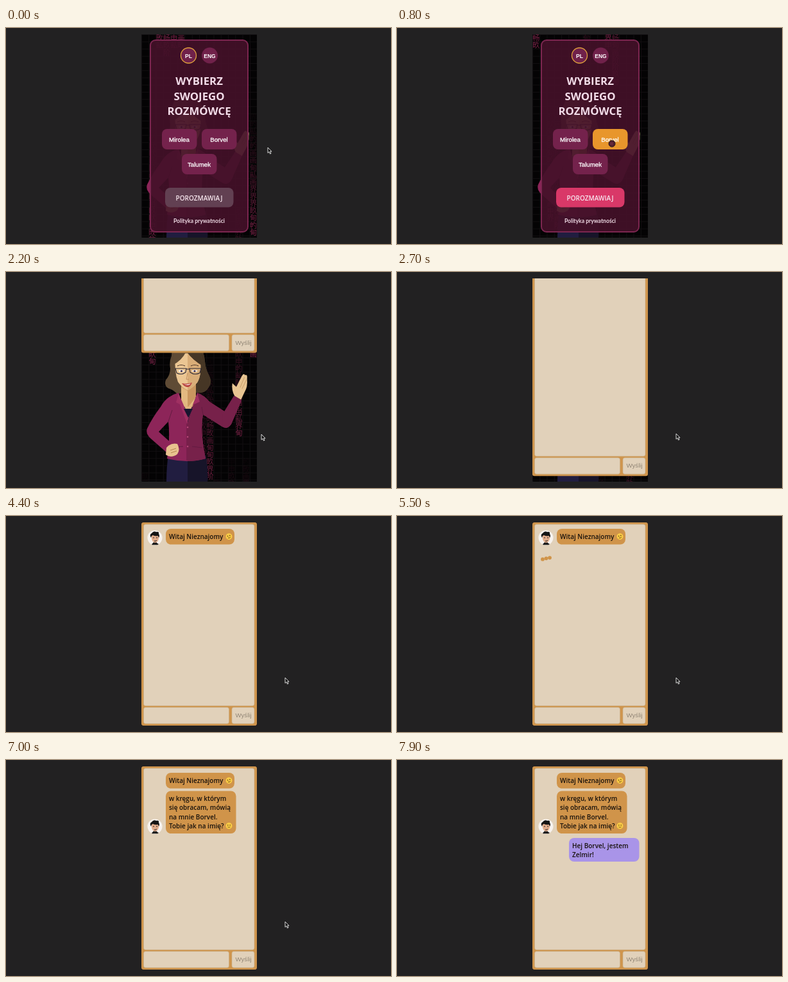
Animation, 600 px wide and 338 px high, one loop 8 s. Source, as an HTML page:

```html
<!DOCTYPE html>
<html lang="pl">
<head>
<meta charset="utf-8">
<style>
html, body { margin: 0; width: 100%; height: 100%; overflow: hidden; background: #222122; }
svg { display: block; width: 100vw; height: 100vh; }
.ui { font-family: "Liberation Sans", Arial, sans-serif; }
.hand { font-family: "Comic Neue", "Open Sans", sans-serif; }
.mid { text-anchor: middle; }
#rain { font: 11px "Noto Sans CJK SC", "Noto Sans CJK JP", sans-serif; fill: #8e2853; }
.title { font-size: 16.8px; font-weight: 700; fill: #f2dce8; }
.chat { font-size: 10px; font-weight: 600; fill: #17110c; }
</style>
</head>
<body>
<svg viewBox="0 0 600 338">
  <defs>
    <clipPath id="screen"><rect x="211" y="10" width="180" height="318"/></clipPath>
    <clipPath id="shade"><rect x="283" y="100" width="108" height="230"/></clipPath>
    <pattern id="grid" x="211" y="10" width="11.25" height="11.25" patternUnits="userSpaceOnUse">
      <rect width="11.25" height="11.25" fill="#040304"/>
      <path d="M0 .5H11.25M.5 0V11.25" stroke="#110e10" fill="none"/>
    </pattern>
    <g id="avatar">
      <circle r="11.5" fill="#f7f2ee"/>
      <path d="M-5 10 0 6 6 10 4 11.2H-4Z" fill="#222"/>
      <path d="M-5-4Q-6 4-2 7Q1 9 4 6Q7 2 6-4Z" fill="#e2ad8c"/>
      <path d="M-6 0Q-9-5-5-7Q-2-11 2-9Q7-10 6-6Q8-3 6 0L5-3Q0-2-3-4L-5-3Z" fill="#151515"/>
      <path d="M-3 0H-1M2 0H4M-1 5Q1 6 3 4" stroke="#222" fill="none"/>
      <path d="M0 9-3 7.500V10.500L0 9 3 10.500V7.500Z" fill="#151515"/>
    </g>
    <g id="smile">
      <circle r="5" fill="#f8cb45"/>
      <circle cx="-1.700" cy="-1" r=".8" fill="#5c3a12"/><circle cx="1.700" cy="-1" r=".8" fill="#5c3a12"/>
      <path d="M-2 1.700Q0 3.200 2 1.700" fill="none" stroke="#5c3a12" stroke-width=".8"/>
    </g>
    <path id="hair" d="M264 112Q285 102 300 114Q309 124 310 140Q311 152 316 161Q322 172 316 180Q311 190 299 189L266 190Q260 184 253 182Q246 178 249 169Q256 161 256 151Q254 141 258 131Q258 120 264 112Z"/>
    <path id="skirt" d="M253 286H311Q315 305 314 330H250Q250 305 253 286Z"/>
    <path id="jacket" d="M269 189 283 236 298 189Q309 193 317 203L345 221 357 194 367 201 351 238Q345 247 337 242L307 223Q302 250 311 292Q283 300 251 292Q256 259 253 234L238 250 258 268 251 283 226 261Q217 253 220 245Q228 228 241 211Q250 194 269 189Z"/>
  </defs>

  <rect width="600" height="338" fill="#222122"/>
  <g clip-path="url(#screen)">
    <rect x="211" y="10" width="180" height="318" fill="url(#grid)"/>
    <g id="rain" class="mid"></g>

    <g id="woman">
      <use href="#hair" fill="#5f4b35"/>
      <use href="#hair" fill="#463625" clip-path="url(#shade)"/>
      <use href="#skirt" fill="#211d40"/>
      <use href="#skirt" fill="#171429" clip-path="url(#shade)"/>
      <path d="M273 174H296V203L284 222 273 203Z" fill="#c9965f"/>
      <path d="M273 180 283 186V220L273 203Z" fill="#e3b981"/>
      <path d="M264 132Q282 122 302 133Q306 160 298 173Q289 183 283 185Q274 181 268 172Q262 156 264 132Z" fill="#ebc693"/>
      <path d="M283 128 302 133Q306 160 298 173Q289 183 283 185Z" fill="#d9ad78"/>
      <path d="M259 146Q274 139 281 124Q292 139 307 147L302 120Q283 107 261 120Z" fill="#5f4b35"/>
      <path d="M281 124Q292 139 307 147L302 120 284 112Z" fill="#463625"/>
      <path d="M267 147Q273 144 279 147M288 147Q294 144 300 147" fill="none" stroke="#493225" stroke-width="1.200"/>
      <path d="M268 155Q273 151 278 155Q273 158 268 155M289 155Q294 151 299 155Q294 158 289 155" fill="#f5efe8"/>
      <circle cx="273.500" cy="155" r="1.600" fill="#392b4d"/><circle cx="294" cy="155" r="1.600" fill="#392b4d"/>
      <path d="M264 151H281L280 157Q273 162 266 158ZM286 151H304L302 158Q294 162 287 157ZM281 152H286" fill="none" stroke="#292633" stroke-width="1.100"/>
      <path d="M283 158 281 168H285" fill="none" stroke="#b98456" stroke-width=".8"/>
      <path d="M274 174Q282 176 290 173Q287 181 282 180Q277 179 274 174" fill="#b8433f"/>
      <path d="M276 175Q282 177 288 174.500Q285 179 276 175" fill="#fff"/>
      <path d="M274 211H295L284 240Z" fill="#17152f"/>
      <use href="#jacket" fill="#8d2559"/>
      <use href="#jacket" fill="#77214a" clip-path="url(#shade)"/>
      <path d="M269 190 265 204 271 207 282 237 291 208 302 203 298 190 284 225Z" fill="#a03062"/>
      <path d="M273 197 284 225 295 197 284 211Z" fill="#e0b57f"/>
      <path d="M277 214H291L284 228Z" fill="#17152f"/>
      <path d="M282 237V295M253 234 259 216M307 223 305 211M259 274 276 273M290 273 306 275" fill="none" stroke="#641b41"/>
      <path d="M283 243h.1M283 258h.1M283 273h.1" stroke="#b74677" stroke-width="2.500" stroke-linecap="round"/>
      <path d="M250 275Q256 267 267 269Q272 278 267 285Q258 292 249 286Z" fill="#e8c28e"/>
      <path d="M256 279 265 276M257 283 266 280" stroke="#b5834f" fill="none"/>
      <g id="arm">
        <path d="M338 222 356 194 367 200 351 238Q346 246 338 242Z" fill="#77214a"/>
        <path d="M357 194Q352 184 354 174L360 180 369 163Q372 158 374 162Q378 160 377 168Q378 180 373 188L367 200Z" fill="#e8c592"/>
        <path d="M366 181 373 165M369 183 376 169" stroke="#c0935f" stroke-width=".8" fill="none"/>
      </g>
    </g>

    <g id="menu">
      <rect x="225" y="19" width="152" height="300" rx="8" fill="#441129" fill-opacity=".92" stroke="#7c2650" stroke-width="2"/>
      <g class="ui mid" font-size="8.500" font-weight="700" fill="#fff">
        <circle cx="284.500" cy="43" r="12" fill="#70214a" stroke="#dfa13c" stroke-width="1.300"/>
        <circle cx="317.500" cy="43" r="12.500" fill="#70214a"/>
        <text x="284.500" y="46.500">PL</text><text x="317.500" y="46.500">ENG</text>
      </g>
      <g class="hand mid title">
        <text x="301" y="89">WYBIERZ</text><text x="301" y="112.500">SWOJEGO</text><text x="301" y="136">ROZMÓWCĘ</text>
      </g>
      <g fill="#74224c">
        <rect x="243" y="158" width="54.500" height="32" rx="8"/>
        <rect id="pick" x="305" y="158" width="54.500" height="32" rx="8"/>
        <rect x="274" y="197" width="54.500" height="32" rx="8"/>
      </g>
      <g class="ui mid" font-size="9.700" fill="#fff" stroke="#fff" stroke-width=".3">
        <text x="270" y="177.500">Mirolea</text><text x="332" y="177.500">Borvel</text><text x="301" y="216.500">Talumek</text>
      </g>
      <rect id="go" x="248" y="250" width="106.500" height="30.500" rx="8"/>
      <text class="hand mid" x="301" y="269.500" font-size="10" font-weight="600" fill="#f7e6ee">POROZMAWIAJ</text>
      <text class="mid" x="301" y="304.500" font-family="Lato, sans-serif" font-size="8.600" font-weight="700" fill="#f0dce6">Polityka prywatności</text>
    </g>

    <g id="panel">
      <rect x="211" y="10" width="180" height="318" rx="3" fill="#cf954d"/>
      <g fill="#e1d1ba" stroke="#c8b08a" stroke-width=".6">
        <rect x="214.500" y="13" width="172.500" height="284" rx="3"/>
        <rect x="214.500" y="299.500" width="133" height="25.500" rx="3"/>
        <rect x="352" y="299.500" width="35" height="25.500" rx="3"/>
      </g>
      <text class="ui mid" x="370" y="315" font-size="9.700" fill="#928676">Wyślij</text>
      <use id="face" href="#avatar"/>
      <g class="hand chat">
        <g id="hello">
          <rect x="249" y="20" width="107" height="24.500" rx="8" fill="#d0944a"/>
          <text x="254" y="36">Witaj Nieznajomy</text>
          <use href="#smile" transform="translate(347.500 32) rotate(-15)"/>
        </g>
        <g id="intro">
          <rect x="249" y="48.500" width="109.500" height="66.500" rx="8" fill="#d0944a"/>
          <text x="254" y="64">w kręgu, w którym</text><text x="254" y="78.300">się obracam, mówią</text>
          <text x="254" y="92.600">na mnie Borvel.</text><text x="254" y="107">Tobie jak na imię?</text>
          <use href="#smile" x="347.500" y="103"/>
        </g>
        <g id="reply">
          <rect x="268" y="122" width="109.500" height="37" rx="8" fill="#a994e8"/>
          <text x="273" y="137.500">Hej Borvel, jestem</text><text x="273" y="152">Zelmir!</text>
        </g>
      </g>
      <g id="dots" fill="#d0944a"><circle r="2.900"/><circle r="2.900"/><circle r="2.900"/></g>
    </g>
  </g>
  <g id="cursor">
    <path id="arrow" d="M0 0V8.500L2 6.700 3.500 10 5 9.300 3.500 6.200H6Z" fill="#111" stroke="#eee" stroke-width=".9"/>
    <g id="pointer"><circle cx="0" cy="3" r="5" fill="#54202f" stroke="#25151a"/><path d="M-2 2H2M-2 4H2" stroke="#a34a5f" stroke-dasharray="1"/></g>
  </g>
</svg>
<script>
const LOOP = 8000, CELL = 11.25, ROWS = 29, TRAIL = 16, CYCLE = 83;
const $ = id => document.getElementById(id);
const set = (id, name, value) => $(id).setAttribute(name, value);
const show = (id, on) => $(id).style.display = on ? '' : 'none';
const clamp = x => Math.max(0, Math.min(1, x));
const smooth = x => (x = clamp(x), x * x * (3 - 2 * x));
const within = (t, a, b) => t >= a && t < b;

// Falling glyph columns
const starts = [60, 28, 1, 2, 1, 1, 50, 70, 47, 44, 60, 65, 58, 38, 58, 27];
const glyphs = '畅申阶畃畋畆畎畄甸界画畂';
let seed = 7;
const rand = () => (seed = seed * 16807 % 2147483647) / 2147483647;
const cells = [];
starts.forEach((start, col) => {
  for (let row = 0; row < ROWS; row++) {
    const el = document.createElementNS('http://www.w3.org/2000/svg', 'text');
    el.textContent = glyphs[Math.floor(rand() * glyphs.length)];
    el.setAttribute('x', 211 + (col + .5) * CELL);
    el.setAttribute('y', 20 + row * CELL);
    $('rain').append(el);
    cells.push({ el, row, start });
  }
});

function drawRain(t) {
  const step = Math.floor(t * .03);
  for (const { el, row, start } of cells) {
    const age = (step + start) % CYCLE - row;
    el.style.opacity = age < 0 || age > TRAIL ? 0 : .85 * (1 - age / (TRAIL + 1));
  }
}

// Cursor stops: time, x, y
const stops = [[0, 408, 187], [150, 408, 187], [700, 335, 178], [1000, 335, 178],
  [1450, 325, 257], [1750, 325, 257], [2200, 398, 254], [2550, 435, 253], [LOOP, 435, 253]];

function cursorAt(t) {
  const i = stops.findIndex(s => s[0] > t);
  const [t0, x0, y0] = stops[i - 1], [t1, x1, y1] = stops[i];
  const p = smooth((t - t0) / (t1 - t0));
  return [x0 + (x1 - x0) * p, y0 + (y1 - y0) * p];
}

function drawDots(t) {
  const first = within(t, 3000, 3900);
  show('dots', first || within(t, 5500, 6800));
  [...$('dots').children].forEach((dot, i) => {
    dot.setAttribute('cx', 227 + i * 5.5);
    dot.setAttribute('cy', (first ? 29 : 67) - 1.8 * Math.sin((t - 6500) / 160 + i * .75 - .4));
  });
}

function draw(t) {
  if (t < 2900) drawRain(t);
  set('arm', 'transform', `rotate(${3 + 4 * Math.sin((t - 100) / 1200 * 2 * Math.PI)} 347 243)`);

  const picked = t >= 800;
  set('pick', 'fill', t >= 600 ? '#e8962c' : '#74224c');
  set('go', 'fill', picked ? '#d93868' : '#624052');
  $('menu').style.opacity = 1 - clamp((t - 1700) / 150);

  set('panel', 'transform', `translate(0 ${-318.5 * (1 - smooth((t - 1782) / 1020))})`);
  show('panel', t > 1782);
  show('hello', t >= 3900);
  show('intro', t >= 6800);
  show('reply', t >= 7400);
  show('face', t >= 3900);
  set('face', 'transform', `translate(232 ${t < 6800 ? 34 : 104})`);
  drawDots(t);

  const overButton = within(t, 600, 1050) || within(t, 1350, 1850);
  set('cursor', 'transform', `translate(${cursorAt(t)})`);
  show('cursor', t < 7200);
  show('arrow', !overButton);
  show('pointer', overButton);
}

function tick() {
  draw(performance.now() % LOOP);
  requestAnimationFrame(tick);
}
tick();
</script>
</body>
</html>
```
